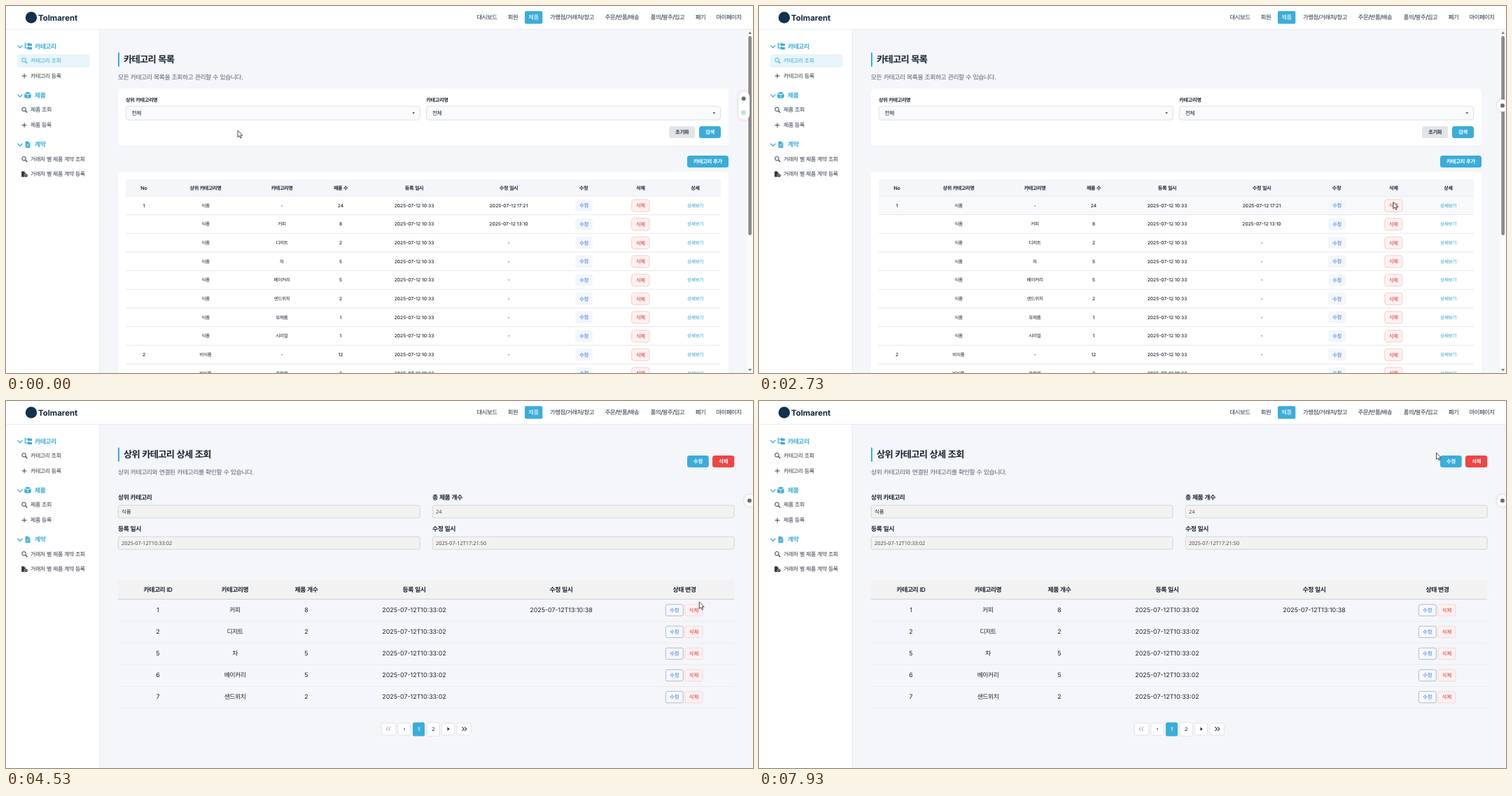
An HTML page for the animation above (8000 ms loop, 1067 by 525 pixels).

```html
<!DOCTYPE html>
<html lang="ko">
<head>
<meta charset="utf-8">
<title>카테고리 목록</title>
<style>
html, body { margin: 0; width: 100%; height: 100%; overflow: hidden; background: #f4f6fa; }
svg { display: block; width: 100%; height: 100%; }
text { font-family: Inter, "Noto Sans CJK KR", "Noto Sans CJK", sans-serif; white-space: pre; text-rendering: geometricPrecision; }
text.ko { letter-spacing: -.056em; word-spacing: .06em; }
text.sys { font-family: "Noto Sans", "Noto Sans CJK KR", "Noto Sans CJK", sans-serif; }
</style>
</head>
<body>
<svg id="stage" viewBox="0 0 1067 525" xmlns="http://www.w3.org/2000/svg"></svg>
<script>
const BLUE = '#3aadda', INK = '#1c2430', RED = '#dc2f2f', LINE = '#e3e6ea';
const HANGUL = /[\uac00-\ud7a3]/;

// cy is the visual middle of the line
function text(x, cy, s, size, o = {}) {
  const { fill = INK, w = 400, at = 'middle', sys = false, id = '' } = o;
  const cls = sys ? 'sys' : HANGUL.test(s) ? 'ko' : '';
  return `<text ${id && `id="${id}"`} class="${cls}" x="${x}" y="${(cy + size * .36).toFixed(2)}" font-size="${size}" font-weight="${w}" fill="${fill}" text-anchor="${at}">${s}</text>`;
}
const left = (x, cy, s, size, o) => text(x, cy, s, size, { at: 'start', ...o });

function box(x, y, w, h, fill, r = 0, stroke = 'none', extra = '') {
  return `<rect x="${x}" y="${y}" width="${w}" height="${h}" rx="${r}" fill="${fill}" stroke="${stroke}" stroke-width=".7" ${extra}/>`;
}
const path = (d, fill, stroke = 'none', w = 1, extra = '') =>
  `<path d="${d}" fill="${fill}" stroke="${stroke}" stroke-width="${w}" ${extra}/>`;
const hline = (x1, x2, y, c, w = .7) => path(`M${x1} ${y}H${x2}`, 'none', c, w);
const group = (id, body, extra = '') => `<g id="${id}" ${extra}>${body}</g>`;

function button(x, y, w, h, label, fill, color, o = {}) {
  return box(x, y, w, h, fill, o.r ?? 3.5, o.stroke, o.id ? `id="${o.id}"` : '') +
    text(x + w / 2, y + h / 2 + .2, label, o.size || 7.41, { fill: color, w: o.w || 600, sys: o.sys });
}

function topBar() {
  const items = [['대시보드', 687], ['회원', 724], ['제품', 753.5], ['가맹점/거래처/창고', 808.5],
    ['주문/반품/배송', 880], ['품의/발주/입고', 945], ['폐기', 992], ['마이페이지', 1032.5]];
  return box(0, 0, 1067, 33, '#fff') + hline(0, 1067, 33.3, LINE) +
    '<circle cx="36" cy="16.5" r="8.2" fill="#12304f"/>' +
    left(46, 16.8, 'Tolmarent', 11.4, { w: 700, fill: '#12263f' }) +
    box(741, 7.2, 25.3, 18.3, BLUE, 2.2) +
    items.map(([s, x]) => text(x, 16, s, 8.34, { w: 500, fill: s === '제품' ? '#fff' : '#222b38' })).join('');
}

const lens = (y, id = '') => `<g ${id && `id="${id}"`} fill="none" stroke="#2b3440"><circle cx="25.6" cy="${y - .7}" r="2.8"/><path d="M27.7 ${y + 1.4}L30.3 ${y + 4}" stroke-width="1.2"/></g>`;
const plus = y => path(`M22.7 ${y}H29.5M26.1 ${y - 3.4}V${y + 3.4}`, 'none', '#2b3440', .9);

function sideBar() {
  const head = (y, s, x) => path(`M16.5 ${y - 1.6}L20 ${y + 2}L23.5 ${y - 1.6}`, 'none', BLUE, 1.3) +
    left(x, y - .3, s, 8.9, { w: 600, fill: BLUE });
  const item = (y, s, id) => left(35, y, s, 8, { w: 500, fill: '#333c48', id });
  return box(0, 33.6, 133, 492, '#fff') + path('M133.3 33.6V525', 'none', LINE, .7) +
    box(16, 69, 103.5, 19, '#e8f5fa', 3.5, 'none', 'id="active"') +
    head(57.7, '카테고리', 41) +
    path('M27.4 52.6V60.2H31M27.4 55H31', 'none', BLUE, 1.2) +
    path('M31 53h2.2l.7.7H37V57H31ZM31 58.3h2.2l.7.7H37v3.3H31Z', BLUE) +
    lens(78, 'lens') + item(78, '카테고리 조회', 'here') +
    plus(100) + item(100.3, '카테고리 등록') +
    head(128, '제품', 41) +
    path('M31 122.8l4.5 1.7-4.5 1.7-4.5-1.7ZM26.3 125.5l4.3 1.7v5.4l-4.3-1.7ZM35.7 125.5l-4.3 1.7v5.4l4.3-1.7Z', BLUE) +
    lens(148.5) + item(148.6, '제품 조회') + plus(170.5) + item(170.6, '제품 등록') +
    head(198.3, '계약', 41) +
    path('M27.7 193.8h4.2v2.5h2.6v6.4h-6.8ZM32.4 193.8l2.1 2.1h-2.1Z', BLUE) +
    path('M29 198.2h4M29 200.6l1.3-1 1 .8 1.7-.4', 'none', '#fff', .6) +
    lens(219) + item(219, '거래처 별 제품 계약 조회') +
    path('M22.2 236.6h3.8v2.2h2.1v5.6h-5.9ZM26.4 236.6l1.7 1.8h-1.7Z', '#2b3440') +
    '<circle cx="28.6" cy="242.4" r="2.5" fill="#2b3440" stroke="#fff" stroke-width=".6"/><circle cx="28.6" cy="242.4" r=".7" fill="#fff"/>' +
    item(240.6, '거래처 별 제품 계약 등록');
}

const title = (s, sub) => box(160, 66.7, 2, 20, BLUE) +
  left(168, 76.2, s, 13.34, { w: 700, fill: '#1b2433' }) +
  left(160, 101.8, sub, 8.9, { fill: '#566070' });

const card = (y, h) => box(160, y + .8, 872, h, '#e9edf2', 5) + box(160, y, 872, h, '#fff', 5);

function listPage() {
  const select = (x, label) => left(x, 134, label, 7.2, { w: 600 }) +
    box(x + .3, 143.2, 420, 19.8, '#f9fafb', 4, '#cfd4da') +
    left(x + 8.6, 153, '전체', 7.78, { w: 500 }) +
    path(`M${x + 409.3} 152.3h3.6l-1.8 1.9Z`, '#222');
  const cols = [197, 285, 394, 478, 583, 718, 825, 906.5, 984.5];
  const heads = ['No', '상위 카테고리명', '카테고리명', '제품 수', '등록 일시', '수정 일시', '수정', '삭제', '상세'];
  const rows = [['1', '-', 24, '17:21'], ['', '커피', 8, '13:10'], ['', '디저트', 2], ['', '차', 5], ['', '베이커리', 5],
    ['', '샌드위치', 2], ['', '유제품', 1], ['', '시리얼', 1], ['2', '-', 12], ['', '포장재', 2]];
  let out = title('카테고리 목록', '모든 카테고리 목록을 조회하고 관리할 수 있습니다.') +
    card(118, 82) + select(171, '상위 카테고리명') + select(600.3, '카테고리명') +
    button(947, 172, 37.3, 17, '초기화', '#e2e4e8', '#2d3540') +
    button(990, 172, 31, 17, '검색', BLUE, '#fff') +
    button(973, 214, 59, 17, '카테고리 추가', BLUE, '#fff', { size: 7.5 }) +
    card(237, 300) + box(171, 248, 850, 24, '#f4f6fa') +
    box(171, 272, 850, 26.4, '#f8f9fa', 0, 'none', 'id="rowHover"') +
    heads.map((s, i) => text(cols[i], 260, s, 7.11, { w: 600 })).join('') + hline(171, 1021, 272, LINE);
  rows.forEach(([no, cat, n, mod], i) => {
    const y = 285.4 + i * 26.67;
    const cells = [no, i < 8 ? '식품' : '비식품', cat, n, '2025-07-12 10:33', mod ? '2025-07-12 ' + mod : '-'];
    out += cells.map((s, c) => text(cols[c], y, String(s), 6.67, { w: 500 })).join('') +
      button(813, y - 8.4, 25, 17, '수정', '#f3f6fb', '#2d70e2', { w: 500 }) +
      button(893.7, y - 8.4, 25.3, 17, '삭제', '#fff2f2', RED, { w: 500, stroke: '#f4b9b9' }) +
      text(984.5, y, '상세보기', 6.67, { w: 500, fill: '#2b9fcf' }) +
      hline(171, 1021, y + 13.2, '#dcdfe3');
  });
  return out + path('M973 289.2H996', 'none', '#2b9fcf', .6, 'id="underline"') +
    box(1058.5, 33.6, 8.5, 492, '#fbfbfb') + box(1060.3, 43, 4.8, 285, '#8b8b8b', 2.4) +
    path('M1060.2 40l2.5-3.8 2.5 3.8ZM1060.2 519l2.5 3.8 2.5-3.8Z', '#858585');
}

function detailHead(cols) {
  const heads = ['카테고리 ID', '카테고리명', '제품 개수', '등록 일시', '수정 일시', '상태 변경'];
  return heads.map((s, i) => text(cols[i], 269.6, s, 8.9, { w: 600 })).join('');
}

const values = (a, b, c, d) =>
  [[165, 158.2, a, INK], [614, 158.2, b], [165, 203.2, c], [614, 203.2, d]]
    .map(([x, y, s, fill = '#4a4a4a']) => left(x, y, s, 7.41, { sys: true, fill })).join('');

function detailPage() {
  const field = (x, y, s) => left(x, y, s, 8.9, { w: 600 }) + box(x + .3, y + 11.8, 430.8, 18, '#f2f2f2', 2.5, '#c9c9c9');
  return title('상위 카테고리 상세 조회', '상위 카테고리와 연결된 카테고리를 확인할 수 있습니다.') +
    button(973, 78, 30.8, 17, '수정', BLUE, '#fff') +
    button(1009, 78, 31.3, 17, '삭제', '#ef4545', '#fff') +
    field(160, 137.4, '상위 카테고리') + field(609, 137.4, '총 제품 개수') +
    field(160, 182.4, '등록 일시') + field(609, 182.4, '수정 일시') +
    box(160, 256, 880, 27.5, '#f2f2f3') + hline(160, 1040, 283.6, '#c4c6c9', .8) +
    group('empty', values('', '0', '', '') + detailHead([243, 404, 552, 691, 831, 970])) +
    group('loaded', detailData());
}

function detailData() {
  const cols = [217, 327, 429, 583, 793, 969];
  const rows = [[1, '커피', 8], [2, '디저트', 2], [5, '차', 5], [6, '베이커리', 5], [7, '샌드위치', 2]];
  const made = '2025-07-12T10:33:02';
  let out = values('식품', '24', made, '2025-07-12T17:21:50') + detailHead(cols);
  rows.forEach((r, i) => {
    const y = 298.6 + i * 31.1;
    const cells = [...r, made, i ? '' : '2025-07-12T13:10:38'];
    out += cells.map((s, c) => text(cols[c], y, String(s), 8.9)).join('') +
      button(942.3, y - 7.6, 25, 16.4, '수정', '#f4f7fe', '#3a76d6', { w: 400, sys: true, r: 2.5, stroke: '#9da2aa' }) +
      button(970, y - 7.6, 25, 16.4, '삭제', '#fff1f1', RED, { w: 400, sys: true, r: 2.5, stroke: '#f6caca', id: i ? '' : 'drop' }) +
      hline(160, 1040, y + 16.5, '#e7e9ec');
  });
  const key = (x, w, y = 461, h = 17) => box(x, y, w, h, '#fff', 2.5, '#d6d9de');
  return out + key(536.3, 20.4) + key(559.8, 18) + box(581, 459.8, 17, 19.6, BLUE, 2.5) +
    key(601, 18.4, 459.8, 19.6) + key(622.5, 18) + key(643.8, 20.4) +
    path('M545.7 466.4l-2.8 2.8 2.8 2.8M549.3 466.4l-2.8 2.8 2.8 2.8', 'none', '#929599', 1) +
    path('M570 467v4.6l-2.6-2.3Z', '#929599') +
    text(589.5, 469.6, '1', 7.41, { w: 600, fill: '#fff' }) + text(610.3, 469.6, '2', 7.41) +
    path('M630.5 466.6v5.2l3.1-2.6Z', '#222') +
    path('M651.4 466.4l2.8 2.8-2.8 2.8M655 466.4l2.8 2.8-2.8 2.8', 'none', '#222', 1.05);
}

const widget = box(1046, 122, 16, 41, '#fff', 8, '#e6e8eb', 'id="pill" style="filter:drop-shadow(0 .5px 1.5px #0002)"') +
  '<circle id="dotA" r="3" fill="#6b6f74"/><circle id="dotB" cx="1053.6" cy="152.5" r="3.6" fill="#bfe8d2"/>';

const statusBar = path('M0 513.5H96.5Q98.3 513.5 98.3 515.3V525H0Z', '#d3e1f3') +
  left(2.5, 519.2, 'localhost:5173/category/top/1', 6.5, { sys: true, fill: '#3a4350' });

const pointer = path('M0 0V9.6L2.2 7.6L3.8 11L5.3 10.3L3.8 7.1H6.8Z', '#fff', '#111', .75, 'id="arrow"') +
  path('M-.9 .9Q-.9 0 0 0T.9 .9V4.6L4.6 5.5Q5.8 5.9 5.8 7.2V9.3Q5.6 11.4 4.9 13H-.4L-3.1 8.7Q-3.6 7.4 -2.6 7.1Q-1.8 7 -.9 8.3Z', '#fff', '#111', .8, 'id="hand"');

document.getElementById('stage').innerHTML = box(0, 0, 1067, 525, '#f4f6fa') +
  group('list', listPage()) + group('detail', detailPage()) + sideBar() + topBar() +
  group('widget', widget) + group('status', statusBar) + group('cursor', pointer, 'stroke-linejoin="round"');

const el = {};
document.querySelectorAll('[id]').forEach(n => el[n.id] = n);
const show = (n, on) => n.style.display = on ? '' : 'none';
const set = (n, attrs) => { for (const k in attrs) n.setAttribute(k, attrs[k]); };
const ramp = (t, a, b) => Math.min(1, Math.max(0, (t - a) / (b - a)));
const mix = (a, b, p) => a + (b - a) * p;

// time, x, y of the pointer tip
const track = [[0, 331, 178], [67, 332, 179], [133, 331, 180], [867, 331, 180], [1000, 345, 181], [1200, 455, 186],
  [1400, 630, 194], [1600, 770, 201], [1733, 825, 204], [1933, 872, 214], [2067, 881.7, 218.3], [2133, 881.7, 218.3],
  [2400, 884, 240], [2600, 888, 273], [2800, 915, 284], [3000, 955, 290], [3267, 990.3, 287.5], [4933, 990.3, 287.5],
  [5400, 995, 312], [5800, 1010, 371], [5867, 1012, 379], [6067, 1014, 395], [6400, 1014, 395], [6533, 1013, 390],
  [6733, 1013, 390], [7000, 1006, 345], [7300, 993, 255], [7600, 976, 160], [7933, 967.5, 74]];

function tip(t) {
  const i = track.findIndex(k => k[0] > t);
  if (i < 0) return track[track.length - 1].slice(1);
  const a = track[i - 1], b = track[i], p = ramp(t, a[0], b[0]);
  return [mix(a[1], b[1], p), mix(a[2], b[2], p)];
}

function draw(now) {
  const step = 200 / 3;
  const t = Math.floor((now % 8000 + 3.4) / step) * step;
  const onList = t < 4060, loaded = t >= 4130;
  const [x, y] = tip(t);

  show(el.list, onList);
  show(el.detail, !onList);
  show(el.empty, !loaded);
  show(el.loaded, loaded);

  const overLink = onList && x > 973 && y > 281;
  const overDrop = loaded && x < 995 && y > 291 && y < 307;
  show(el.rowHover, y > 272.5);
  show(el.underline, overLink);
  set(el.drop, { fill: overDrop ? '#fee2e2' : '#fff1f1' });
  show(el.hand, overLink || overDrop);
  show(el.arrow, !overLink && !overDrop);
  set(el.cursor, { transform: `translate(${x.toFixed(2)} ${y.toFixed(2)})` });

  set(el.active, { opacity: 1 - ramp(t, 4080, 4280) });
  set(el.here, { fill: onList ? BLUE : '#333c48' });
  set(el.lens, { stroke: onList ? BLUE : '#2b3440' });
  set(el.status, { opacity: Math.min(ramp(t, 3400, 3530), 1 - ramp(t, 4330, 4530)) });

  const q = ramp(t, 1660, 2000), p = q * q * (3 - 2 * q);
  set(el.pill, { x: mix(1046, 1054, p), y: mix(122, 134, p), height: mix(41, 17, p), width: mix(16, 17, p) });
  set(el.dotA, { cx: mix(1053.6, 1062, p), cy: mix(132.6, 142.4, p) });
  set(el.dotB, { opacity: 1 - ramp(p, 0, .5), cx: mix(1053.6, 1062, p), cy: mix(152.5, 146, p) });
}

function loop() {
  draw(performance.now());
  requestAnimationFrame(loop);
}
loop();
</script>
</body>
</html>
```
